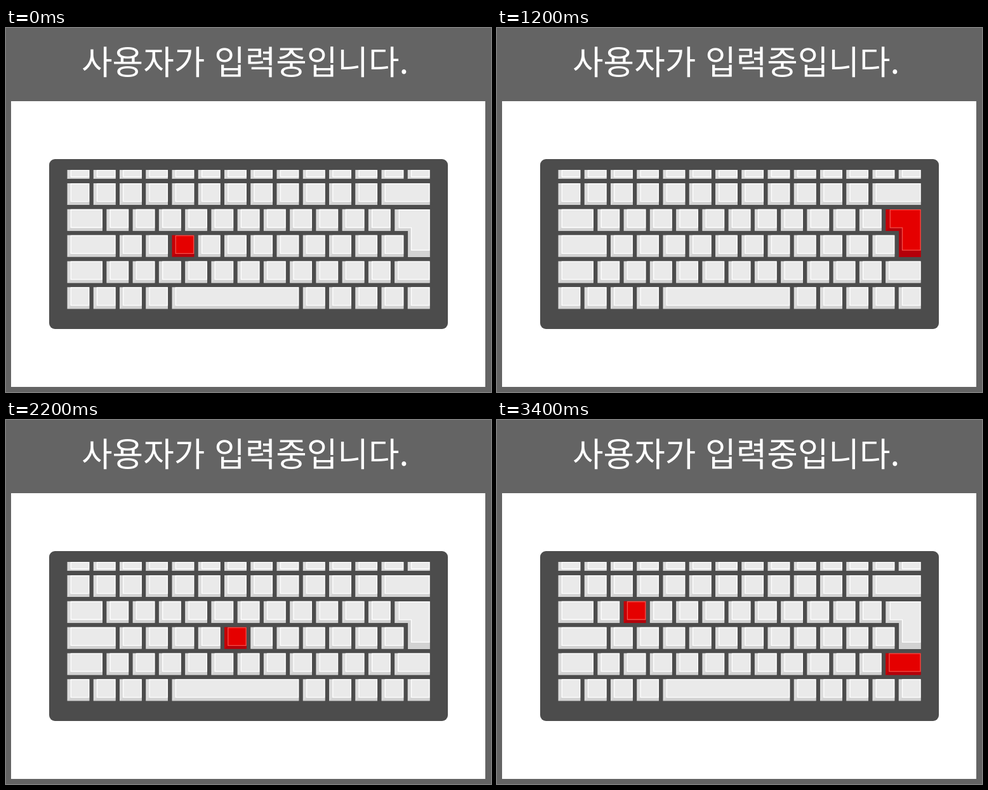
An HTML page that plays this animation: 764x572 px, repeating every 3.6 s.

```html
<!DOCTYPE html>
<html lang="ko">
<head>
<meta charset="utf-8">
<title>입력중</title>
<style>
  html, body { margin: 0; width: 100%; height: 100%; overflow: hidden; background: #646464; }
  svg { display: block; }
  .title { font: 500 52.8px "Noto Sans CJK KR", "Noto Sans CJK", sans-serif; fill: #fff; }
  .side { fill: #dcdcdc; }
  .base { fill: #d2d2d2; }
  .face { fill: #eaeaea; stroke: #fff; stroke-width: 1.3; }
  .on .side { fill: #c60006; }
  .on .base { fill: #b4000a; }
  .on .face { fill: #e50000; stroke: #f4504a; }
</style>
</head>
<body>
<svg width="764" height="572" viewBox="0 0 764 572">
  <text class="title" x="119" y="73">사용자가 입력중입니다.</text>
  <path fill="#fff" d="M8 115H755V564H8Z"/>
  <rect x="68" y="206" width="628" height="267" rx="9" fill="#4c4c4c"/>
  <g id="keys"></g>
</svg>
<script>
const UNIT = 41.25, LEFT = 96.5, GAP = 6.5, STEP = 200;
const board = document.getElementById('keys');
const keys = {};

function add(id, outline, base, face) {
  const g = document.createElementNS('http://www.w3.org/2000/svg', 'g');
  g.innerHTML = `<path class="side" d="${outline}"/><path class="base" d="${base}"/><path class="face" d="${face}"/>`;
  board.append(g);
  keys[id] = g;
}

const box = (x, y, r, b) => `M${x} ${y}H${r}V${b}H${x}Z`;

function key(id, unit, span, y, h = 34, lip = 5.3) {
  const x = LEFT + unit * UNIT, r = x + span * UNIT - GAP, b = y + h;
  const slope = `M${x} ${b}L${x + 5.5} ${b - lip}H${r}V${b}Z`;
  add(id, box(x, y, r, b), slope, box(x + 5.8, y + .7, r - .6, b - lip));
}

// Each row lists its key names, with an optional width in key units after a colon.
const rows = [
  'esc f1 f2 f3 f4 f5 f6 f7 f8 f9 f10 f11 f12 del',
  '` 1 2 3 4 5 6 7 8 9 0 - back:2',
  'tab:1.5 q w e r t y u i o p [ ]',
  "caps:2 a s d f g h j k l ; '",
  'shift:1.5 < z x c v b n m , . / rshift:1.5',
  'ctrl fn win alt space:5 ralt menu left down right'
];
rows.forEach((row, i) => {
  let unit = 0;
  for (const item of row.split(' ')) {
    const [id, span = 1] = item.split(':');
    if (i) key(id, unit, +span, 244 + (i - 1) * 40.8);
    else key(id, unit, 1, 223, 14, 3);
    unit += +span;
  }
});
// "]" sits where the L-shaped Enter belongs.
keys[']'].remove();
add('enter', 'M612.3 285H667.6V360H633.3V319H612.3Z',
  'M612.3 319L619 313.8H638.5V349L633.3 360V319ZM633.3 360L638.5 349.2H667.6V360Z',
  'M619.3 285.6H667V349.2H638.5V313.8H619.3Z');

const typed = ['d', 'o', 's', 'l', 'k', 'shift', 'enter', 'c', 'space',
  'back', 'r', 'g', 'h', 'c', 'j', 'm', 'e', 'w rshift'];
let shown = [];

function draw(now) {
  const press = typed[Math.floor(now / STEP) % typed.length].split(' ');
  for (const id of shown) keys[id].classList.remove('on');
  for (const id of press) keys[id].classList.add('on');
  shown = press;
  requestAnimationFrame(draw);
}
draw(performance.now());
</script>
</body>
</html>
```
